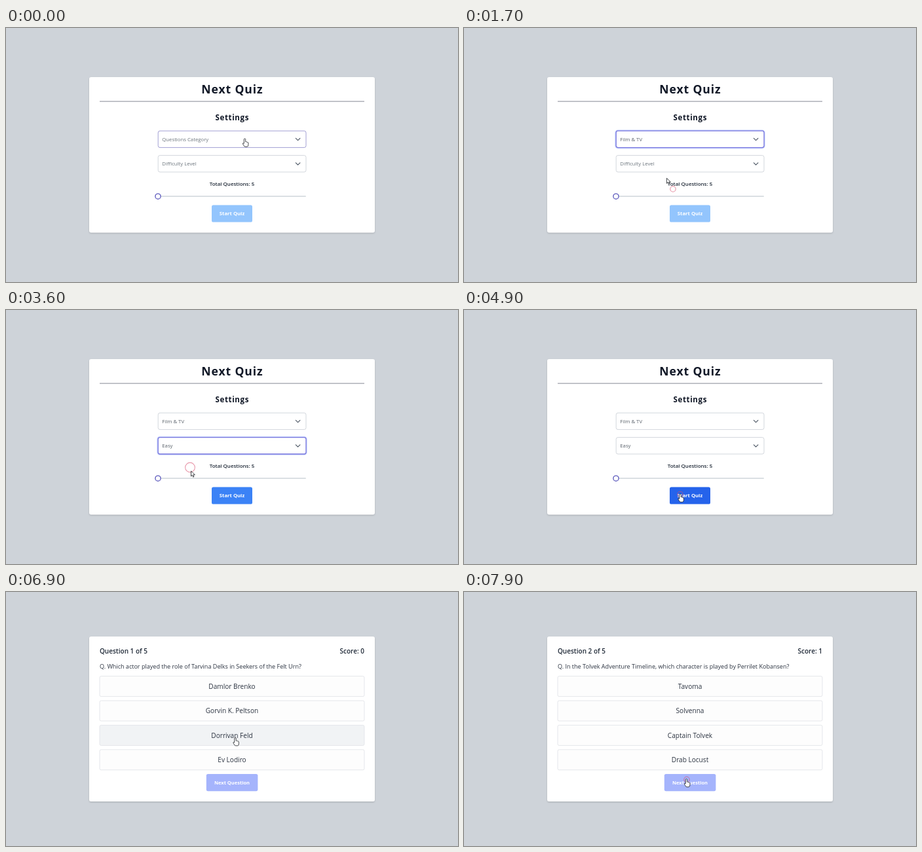
Animation, 690 px wide and 388 px high, one loop 8000 ms. Source, as an HTML page:

```html
<!DOCTYPE html>
<html lang="en">
<head>
<meta charset="utf-8">
<title>Quiz</title>
<style>
html, body { margin: 0; width: 100%; height: 100%; overflow: hidden; background: #ced3d9; }
svg { display: block; width: 690px; height: 388px; font-family: "Open Sans", "Noto Sans", sans-serif; }
</style>
</head>
<body>
<svg id="stage" viewBox="0 0 690 388"></svg>
<script>
const LOOP = 8000;
const stage = document.getElementById('stage');

// Pointer path: time, x, y of the tip
const path = [
  [0, 364.5, 169.5], [300, 364, 169.5], [550, 363, 170], [1100, 323.5, 226.5],
  [1300, 319, 246], [1450, 319, 246], [1950, 300, 213], [2250, 300, 213],
  [2500, 299, 217.5], [2950, 281, 240], [3250, 281, 240], [3550, 282.5, 246],
  [3850, 282.5, 246], [4100, 330, 281.5], [6250, 330, 281.5], [6700, 350, 223],
  [7000, 350, 223], [7450, 339.5, 286], [8000, 339.5, 286]
];
// Click ripples: start, x, y
const clicks = [
  [300, 363, 169.5], [1300, 319, 246], [2050, 300, 213], [3000, 281, 240.5],
  [4500, 330, 281.5], [6850, 350, 223], [7500, 340, 286.5]
];
const RIPPLE = 890;

const quiz = [
  {
    ask: 'Q. Which actor played the role of Tarvina Delks in Seekers of the Felt Urn?',
    options: ['Damlor Brenko', 'Gorvin K. Peltson', 'Dorrivan Feld', 'Ev Lodiro']
  },
  {
    ask: 'Q. In the Tolvek Adventure Timeline, which character is played by Perrilet Kobansen?',
    options: ['Tavoma', 'Solvenna', 'Captain Tolvek', 'Drab Locust']
  }
];
const categories = ['General Knowledge', 'Arts &amp; Literature', 'Film &amp; TV', 'Food &amp; Drink'];
const levels = ['Easy', 'Medium', 'Hard'];

const clamp = v => Math.min(1, Math.max(0, v));
const smooth = p => p * p * (3 - 2 * p);
const ramp = (t, start, span) => clamp((t - start) / span);

const rect = (x, y, w, h, fill, r = 0, more = '') =>
  `<rect x="${x}" y="${y}" width="${w}" height="${h}" rx="${r}" fill="${fill}" ${more}/>`;
const text = (x, y, size, str, fill, weight = 400, anchor = 'middle', more = '') =>
  `<text x="${x}" y="${y}" font-size="${size}" font-weight="${weight}" fill="${fill}" text-anchor="${anchor}" ${more}>${str}</text>`;
const inside = (p, x, y, w, h) => p.x >= x && p.x <= x + w && p.y >= y && p.y <= y + h;

const defs = `<defs>
  <filter id="cardShadow" x="-10%" y="-10%" width="120%" height="125%">
    <feDropShadow dx="0" dy="1.2" stdDeviation="1.3" flood-color="#000" flood-opacity=".18"/></filter>
  <filter id="panelShadow" x="-10%" y="-10%" width="120%" height="125%">
    <feDropShadow dx="0" dy="1" stdDeviation="1.6" flood-color="#000" flood-opacity=".13"/></filter>
  <clipPath id="panelClip"><rect x="232" y="183" width="226" height="100"/></clipPath>
</defs>`;

function pointerAt(t) {
  let i = 1;
  while (i < path.length - 1 && path[i][0] < t) i++;
  const [t0, x0, y0] = path[i - 1], [t1, x1, y1] = path[i];
  const k = smooth(ramp(t, t0, t1 - t0));
  return { x: x0 + (x1 - x0) * k, y: y0 + (y1 - y0) * k };
}

function card(y, h) {
  return rect(127, y, 436, h, '#fff', 3, 'filter="url(#cardShadow)"');
}

function select(y, label, color, hover, focus) {
  const border = focus ? '#7a78dd' : hover ? '#a3a0d4' : '#d3d7dd';
  return (focus ? rect(231.5, y - .5, 227, 26.5, 'none', 3.5, 'stroke="#c7d2fe" stroke-width="2.4"') : '') +
    rect(232.2, y, 225.8, 25.4, '#fff', 2.8, `stroke="${border}" stroke-width="${focus ? 1.3 : 1}"`) +
    text(238.3, y + 15.8, 7.75, label, color, 400, 'start') +
    `<path d="M442.3 ${y + 11.2}l3.3 3.3 3.3-3.3" fill="none" stroke="#4b5563" stroke-width="1.1" stroke-linecap="round" stroke-linejoin="round"/>`;
}

function panel(y, h, items, first, width, p, show) {
  if (show <= 0) return '';
  const rows = items.map((name, i) => {
    const top = first + i * 24.2;
    const on = inside(p, 232, top, 226, 24.2) && p.y < y + h;
    return (on ? rect(232, top, width, 24.2, '#e9ebef') : '') +
      text(242, top + 14.8, 7.7, name, '#4f5760', 400, 'start');
  }).join('');
  const grow = .8 + .2 * show;
  return `<g opacity="${show}" transform="translate(0 ${y * (1 - grow)}) scale(1 ${grow})">` +
    rect(232, y, 226, h, '#fff', 2, 'filter="url(#panelShadow)"') + rows + '</g>';
}

function settings(t, p) {
  const open1 = Math.min(ramp(t, 450, 120), 1 - ramp(t, 1450, 100));
  const open2 = Math.min(ramp(t, 2180, 120), 1 - ramp(t, 3150, 100));
  const free = open1 <= 0 && open2 <= 0;
  const hover1 = inside(p, 232, 157, 226, 25);
  const hover2 = open1 <= 0 && inside(p, 232, 194.5, 226, 25);
  const hoverStart = free && inside(p, 314, 270.5, 62, 26);
  const picked = t >= 1430, ready = t >= 3150;
  const hand = hover1 || hover2 || hoverStart ||
    open1 > 0 && inside(p, 232, 183, 226, 100) ||
    open2 > 0 && inside(p, 232, 220, 226, 84);
  const startFill = !ready ? '#93c5fd' : hoverStart ? '#2563eb' : '#3b82f6';

  const art = card(75, 237.5) +
    text(345.4, 99.8, 17.6, 'Next Quiz', '#111827', 700, 'middle', 'letter-spacing=".88"') +
    rect(143, 111.6, 404, 1, '#858894') +
    text(345.3, 141.2, 11.6, 'Settings', '#111827', 700, 'middle', 'letter-spacing=".58"') +
    select(157.2, picked ? categories[2] : 'Questions Category', picked ? '#5b636c' : '#6c757d',
      hover1, t >= 380 && t < 2120) +
    select(194.6, ready ? levels[0] : 'Difficulty Level', ready ? '#5b636c' : '#6c757d',
      hover2, t >= 2120 && t < 4560) +
    text(345, 240.9, 7.95, 'Total Questions: 5', '#1f2937', 600) +
    rect(232, 256.2, 226, 1.8, '#d6dce0', .9) +
    '<circle cx="232" cy="257.2" r="4.1" fill="#fff" stroke="#6360c0" stroke-width="1.4"/>' +
    rect(314, 270.4, 62, 26.2, startFill, 2.6) +
    text(345, 286.4, 7.7, 'Start Quiz', '#fff', 700) +
    panel(183, 100, categories, 188.8, 223.5, p, open1) +
    (open1 > 0 ? rect(455.6, 183, 2.4, 39, '#555', 0, `opacity="${open1}"`) : '') +
    panel(220.4, 83.6, levels, 226.2, 226, p, open2);
  return { art, hand };
}

function question(t, p) {
  const n = t < 7650 ? 0 : 1;
  const { ask, options } = quiz[n];
  const answered = n ? 0 : ramp(t, 7000, 150);
  const score = t >= 7000 ? 1 : 0;
  const hoverNext = inside(p, 306, 278, 78.5, 26);
  let hand = hoverNext;

  const rows = options.map((name, i) => {
    const y = 128.6 + i * 37.4;
    const on = inside(p, 143, y, 404, 31);
    hand = hand || on;
    return rect(143, y, 404, 31, on ? '#f1f3f5' : '#fdfdfd', 2.2, 'stroke="#e5e7eb" stroke-width="1"') +
      (answered && i === 2 ? rect(143, y, 404, 31, '#4ade80', 2.2, `opacity="${answered}"`) : '') +
      text(345, y + 19.1, 10.1, name, '#2b3340');
  }).join('');
  const nextFill = !answered ? '#a5b4fc' : hoverNext ? '#4f46e5' : '#6366f1';

  const art = card(68, 252) +
    text(143, 94.4, 10, `Question ${n + 1} of 5`, '#1f2937', 600, 'start') +
    text(547, 94.4, 10, `Score: ${score}`, '#1f2937', 600, 'end') +
    text(143, 116.7, 9.05, ask, '#2b3340', 400, 'start') +
    rows +
    rect(305.8, 278, 78.6, 26.2, nextFill, 2.6) +
    text(345, 294, 7.5, 'Next Question', '#fff', 700);
  return { art, hand };
}

function ripples(t) {
  return clicks.map(([start, x, y]) => {
    const k = (t - start) / RIPPLE;
    if (k <= 0 || k >= 1) return '';
    return `<circle cx="${x}" cy="${y}" r="${9.8 * smooth(k)}" fill="none" stroke="#d8506e" stroke-opacity="${.75 - .25 * k}" stroke-width="1.1"/>`;
  }).join('');
}

function pointer(p, hand) {
  const d = hand
    ? 'M-1.2 .8Q-1.2-.5 0-.5T1.2 .8V4.2Q2.2 3.8 2.6 4.6 3.6 4.2 4 5 5.4 4.8 5.4 6.4V8.8Q5.4 11.6 3.6 11.8H.6Q-.8 11.8-1.8 9.6L-3.2 7.2Q-3.4 5.8-1.2 6.8Z'
    : 'M0 0V8L1.9 6.3 3.2 9.2 4.5 8.6 3.3 5.8 5.9 5.7Z';
  return `<path transform="translate(${p.x} ${p.y})" d="${d}" fill="#fff" stroke="#24272c" stroke-width=".85" stroke-linejoin="round"/>`;
}

function render(t) {
  const p = pointerAt(t);
  const { art, hand } = t < 5050 ? settings(t, p) : question(t, p);
  stage.innerHTML = defs + rect(0, 0, 690, 388, '#ced3d9') + art + ripples(t) + pointer(p, hand);
}

const begin = performance.now();
function tick() {
  render((performance.now() - begin) % LOOP);
  requestAnimationFrame(tick);
}
tick();
</script>
</body>
</html>
```
